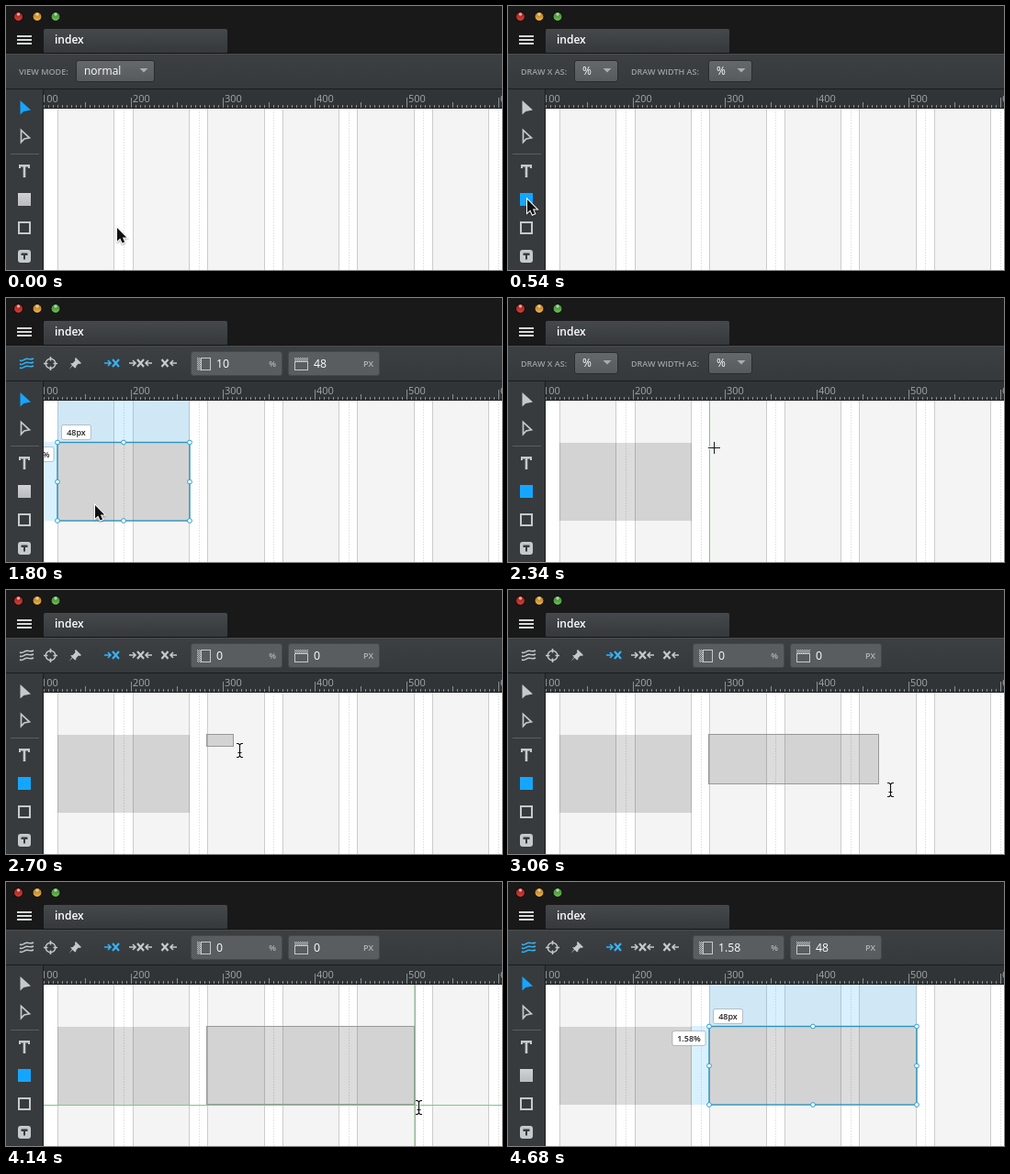
Animation of 540 by 288 pixels, one loop 5720 ms. Source, as an HTML page with a canvas:

```html
<!DOCTYPE html>
<html lang="en">
<head>
<meta charset="utf-8">
<title>Drawing on a grid</title>
<style>
html, body { margin: 0; width: 100%; height: 100%; overflow: hidden; background: #fff; }
canvas { display: block; }
</style>
</head>
<body>
<canvas id="stage" width="540" height="288"></canvas>
<script>
const ctx = document.getElementById('stage').getContext('2d');
const STEP = 180, LAST = 26, LOOP = 5720;
const BLUE = '#14a6ff', ICON = '#c6c9cb', GUIDE = '#78cb80';
const TOP = 157;
const BOXES = [{ x: 56, right: 200, offset: '10' }, { x: 219, right: 445, offset: '1.58' }];

// Each entry: first step, toolbar, cursor, cursor x, cursor y, extras.
// size = corner being dragged, v / h = alignment guides.
const scenes = [
  [0, 'view', 'pointer', 121, 242],
  [1, 'view', 'pointer', 78, 228],
  [2, 'view', 'pointer', 21, 211],
  [3, 'draw', 'pointer', 21, 211],
  [4, 'draw', 'cross', 46, 176],
  [5, 'draw', 'cross', 58, 160, { v: 56 }],
  [6, 'drag', 'beam', 92, 188, { size: [88, 186] }],
  [7, 'drag', 'beam', 158, 222, { size: [152, 219] }],
  [8, 'drag', 'beam', 203, 247, { size: [200, 243], v: 199 }],
  [10, 'select', 'pointer', 97, 226],
  [11, 'select', 'pointer', 21, 211],
  [12, 'draw', 'cross', 128, 186],
  [13, 'draw', 'cross', 224, 163, { v: 219 }],
  [14, 'draw', 'cross', 221, 159, { v: 219, h: 157 }],
  [15, 'drag', 'beam', 254, 175, { size: [248, 171] }],
  [16, 'drag', 'beam', 342, 199, { size: [331, 194] }],
  [17, 'drag', 'beam', 416, 218, { size: [404, 212] }],
  [18, 'drag', 'beam', 438, 230, { size: [432, 226] }],
  [19, 'drag', 'beam', 446, 238, { size: [445, 235], v: 445 }],
  [20, 'drag', 'beam', 448, 243, { size: [445, 243], v: 445, h: 243 }],
  [21, 'drag', 'beam', 449, 245, { size: [445, 243], v: 445, h: 243 }],
  [22, 'drag', 'beam', 449, 246, { size: [445, 243], v: 445, h: 243 }],
  [24, 'select', 'pointer', 452, 250],
  [25, 'select', 'pointer', 480, 274],
  [26, 'select', 'none', 0, 0]
];

function rect(x, y, w, h, fill) {
  ctx.fillStyle = fill;
  ctx.fillRect(x, y, w, h);
}
function frame(x, y, w, h, color, width = 1) {
  ctx.strokeStyle = color;
  ctx.lineWidth = width;
  ctx.strokeRect(x, y, w, h);
}
function text(s, x, y, size, color, weight = 400, align = 'left') {
  ctx.font = `${weight} ${size}px "Open Sans", sans-serif`;
  ctx.textAlign = align;
  ctx.fillStyle = color;
  ctx.fillText(s, x, y);
}
function stroke(d, color, width = 1) {
  ctx.strokeStyle = color;
  ctx.lineWidth = width;
  ctx.stroke(new Path2D(d));
}
function fill(d, color) {
  ctx.fillStyle = color;
  ctx.fill(new Path2D(d));
}
function rounded(x, y, w, h, r, color, border) {
  ctx.beginPath();
  ctx.roundRect(x, y, w, h, r);
  ctx.fillStyle = color;
  ctx.fill();
  if (border) {
    ctx.strokeStyle = border;
    ctx.lineWidth = 1;
    ctx.stroke();
  }
}
function circle(x, y, r, color, border, width = 1) {
  ctx.beginPath();
  ctx.arc(x, y, r, 0, 7);
  if (color) { ctx.fillStyle = color; ctx.fill(); }
  if (border) { ctx.strokeStyle = border; ctx.lineWidth = width; ctx.stroke(); }
}
function vertical(y0, y1, ...colors) {
  const g = ctx.createLinearGradient(0, y0, 0, y1);
  colors.forEach((c, i) => g.addColorStop(i / (colors.length - 1), c));
  return g;
}

function drawGrid() {
  for (let i = 0; i < 6; i++) {
    const x = Math.round(56 + i * 81.6), right = Math.round(117.4 + i * 81.6);
    rect(x, 112, right - x + 1, 176, 'rgba(0,0,0,.043)');
    rect(x, 112, 1, 176, 'rgba(0,0,0,.16)');
    rect(right, 112, 1, 176, 'rgba(0,0,0,.16)');
    for (let y = 112; y < 288; y += 3) rect(Math.round(128 + i * 81.6), y, 1, 2, 'rgba(0,0,0,.1)');
  }
}

function drawTag(label, x, y, w) {
  rounded(x, y, w, 16, 2, '#fff', 'rgba(0,0,0,.22)');
  text(label, x + w / 2, y + 11.5, 9, '#222', 600, 'center');
}

function drawSelection({ x, right, offset }, left) {
  const w = right - x, mid = (x + right) / 2;
  rect(x, 112, w, TOP - 112, 'rgba(0,160,255,.15)');
  rect(left, TOP, x - left, 86, 'rgba(0,160,255,.15)');
  frame(x, TOP + .5, w, 85.5, '#2b93bd', 1.4);
  for (const hx of [x, mid, right])
    for (const hy of [TOP + .5, 200.5, 243])
      if (hx !== mid || hy !== 200.5) circle(hx, hy, 2.4, '#fff', '#2b9fcd');
  drawTag('48px', x + 4.5, 138.5, 32);
  const tagWidth = offset === '10' ? 27 : 36;
  drawTag(offset + '%', x - 4 - tagWidth, 162.5, tagWidth);
}

function drawCanvasArea(step, mode, { size, v, h }) {
  ctx.save();
  ctx.beginPath();
  ctx.rect(41, 112, 499, 176);
  ctx.clip();
  rect(41, 112, 499, 176, '#fff');
  const current = BOXES[step < 12 ? 0 : 1];
  if (step >= 10) rect(56, TOP + 1, 144, 85, '#dcdcdc');
  if (step >= 24) rect(219, TOP + 1, 226, 85, '#dcdcdc');
  if (size) rect(current.x, TOP, size[0] - current.x, size[1] - TOP, '#dcdcdc');
  drawGrid();
  if (size) frame(current.x - .5, TOP + .5, size[0] - current.x, size[1] - TOP - 1, '#999');
  if (v) rect(v, 112, 1, 176, GUIDE);
  if (h) rect(41, h, 499, 1, GUIDE);
  if (mode === 'select') drawSelection(current, step < 12 ? 41 : 200);
  ctx.restore();
}

function drawRuler() {
  rect(41, 91, 499, 21, '#303437');
  ctx.save();
  ctx.beginPath();
  ctx.rect(41, 91, 499, 21);
  ctx.clip();
  for (let n = 100; n <= 600; n += 5) {
    const tall = n % 100 === 0 ? 11 : n % 50 === 0 ? 6 : 3;
    rect(n - 64, 111 - tall, 1, tall, '#8b9093');
    if (n % 100 === 0) text(n, n - 62, 105, 11, '#a3a8ab');
  }
  ctx.restore();
  rect(41, 111, 499, 1, '#17191a');
}

function drawWindow() {
  rect(0, 0, 540, 52, '#191919');
  [[13.5, '#d9453c', '#8d1c17'], [34, '#f0bd4e', '#a66a14'], [54, '#79c45c', '#2f7a29']].forEach(([x, light, dark]) => {
    circle(x, 11.5, 5, vertical(6, 17, dark, light), '#0b0b0b');
    circle(x, 9, 1.8, 'rgba(255,255,255,.6)');
  });
  for (const y of [32, 36, 40]) rect(12, y, 16, 2, '#d5d7d8');
  rounded(41, 25, 200, 27, [2, 2, 0, 0], vertical(25, 52, '#45494c', '#34383b'));
  text('index', 53, 41, 12, '#fff', 600);
  rect(0, 51, 540, 1, '#151515');
  rect(0, 52, 540, 39, vertical(52, 91, '#3c4043', '#35393c'));
  rect(0, 52, 540, 1, '#484c4f');
  rect(0, 90, 540, 1, '#1b1d1e');
}

function drawSidebar(rectTool) {
  rect(0, 91, 41, 197, '#373b3e');
  rect(40, 91, 1, 197, '#1b1d1e');
  fill('M15.5 103V118.5L19.3 115L27 113.5Z', rectTool ? ICON : BLUE);
  stroke('M16.5 135.5V148.5L19.8 145L25.5 143.8Z', ICON, 1.7);
  rect(5, 161, 31, 1, '#5a5f62');
  fill('M14 173H26V177H24V175.5H21.3V187H18.7V175.5H16V177H14Z', ICON);
  rect(13, 204, 14, 14, rectTool ? BLUE : vertical(204, 218, '#d0d2d3', '#b9bcbe'));
  frame(14, 236, 12, 12, ICON, 2);
  rounded(13, 266, 14, 14, 3, ICON);
  fill('M16.5 269.5H23.5V272H21V276.5H19V272H16.5Z', '#373b3e');
}

function drawSelect(x, w, value) {
  rounded(x + .5, 59.5, w - 1, 23, 2.5, vertical(59, 83, '#65696c', '#565a5d'), '#2a2d2f');
  text(value, x + 9, 75, 12, '#fff');
  const a = x + w - 16.5;
  fill(`M${a} 68h9l-4.5 4.5z`, '#a9adaf');
}

function drawField(x, value, unit) {
  rounded(x + .5, 58.5, 99, 26, 2.5, '#595d60', '#45494c');
  text(value, x + 28, 76, 12.3, '#fff');
  text(unit, x + 93, 75, 9, '#b4b7b9', 600, 'right');
}

function dots(x, y, w, h) {
  for (let j = 0; j < h; j++)
    for (let i = j % 2; i < w; i += 2) rect(x + i, y + j, 1, 1, ICON);
}

// A small horizontal arrow: dir 1 points right, -1 points left.
function arrow(x, dir, color) {
  stroke(`M${x} 71h${dir * 7}m${-dir * 3} -3l${dir * 3} 3l${-dir * 3} 3`, color, 1.6);
}
function cross(x, color) {
  stroke(`M${x} 67l7 8m0 -8l-7 8`, color, 2.2);
}

function drawProperties(selected, offset) {
  for (const y of [67, 71, 75])
    stroke(`M15 ${y + 1}c4 2 5 -2.6 9 -1.6c2 .6 4 .6 6 -.4`, selected ? '#35b3f5' : ICON, 1.5);
  circle(48.5, 71.5, 5.3, null, ICON, 1.4);
  stroke('M48.5 64v4.5m0 6v4.5M41 71.5h4.5m6 0h4.5', ICON, 1.6);
  fill('M76 65L82 71L80.5 72L79 71.5L76.5 74L76 76.5L74.5 76L72.5 74L68.5 78L72 73.2L70 71.5L72.7 71L75.4 68.3L75 66Z', ICON);
  arrow(107, 1, '#35b3f5');
  cross(116, '#35b3f5');
  arrow(134, 1, ICON);
  cross(143, ICON);
  arrow(159, -1, ICON);
  cross(169.5, ICON);
  arrow(186, -1, ICON);
  drawField(201, selected ? offset : '0', '%');
  dots(208, 65, 4, 14);
  frame(212.5, 65.5, 10, 13, ICON);
  drawField(307, selected ? '48' : '0', 'PX');
  dots(314, 65, 15, 4);
  frame(314.5, 69.5, 14, 9, ICON);
}

function drawToolbar(mode, step) {
  const label = (s, x) => text(s, x, 75, 9, '#9ca1a4', 600);
  if (mode === 'view') {
    label('VIEW MODE:', 14);
    drawSelect(76, 86, 'normal');
  } else if (mode === 'draw') {
    label('DRAW X AS:', 14);
    drawSelect(72, 48, '%');
    label('DRAW WIDTH AS:', 134);
    drawSelect(218, 48, '%');
  } else {
    drawProperties(mode === 'select', BOXES[step < 12 ? 0 : 1].offset);
  }
}

const cursors = {
  none() {},
  pointer() {
    const d = 'M0 0V14.5L3.3 11.4L5.6 16.6L8.2 15.5L5.9 10.5H10.3Z';
    ctx.shadowColor = 'rgba(0,0,0,.35)';
    ctx.shadowBlur = 2;
    ctx.shadowOffsetY = 1;
    stroke(d, '#fff', 2);
    ctx.shadowColor = 'transparent';
    fill(d, '#111');
  },
  cross() {
    stroke('M-6 .5H7M.5 -6V7', '#fff', 3);
    stroke('M-6 .5H7M.5 -6V7', '#111');
  },
  beam() {
    const d = 'M-3 -7.5H-1L.5 -6L2 -7.5H4M.5 -6V6M-3 7.5H-1L.5 6L2 7.5H4M-1.5 2.5H2.5';
    stroke(d, 'rgba(255,255,255,.8)', 3);
    stroke(d, '#111', 1.2);
  }
};

function render(time) {
  const step = Math.min(LAST, Math.floor(time % LOOP / STEP));
  const [, mode, cursor, x, y, extras = {}] = scenes.findLast(scene => scene[0] <= step);
  drawCanvasArea(step, mode, extras);
  drawWindow();
  drawRuler();
  drawSidebar(mode === 'draw' || mode === 'drag');
  drawToolbar(mode, step);
  ctx.save();
  ctx.translate(x, y);
  cursors[cursor]();
  ctx.restore();
}

const start = performance.now();
function tick() {
  render(performance.now() - start);
  requestAnimationFrame(tick);
}
tick();
</script>
</body>
</html>
```
